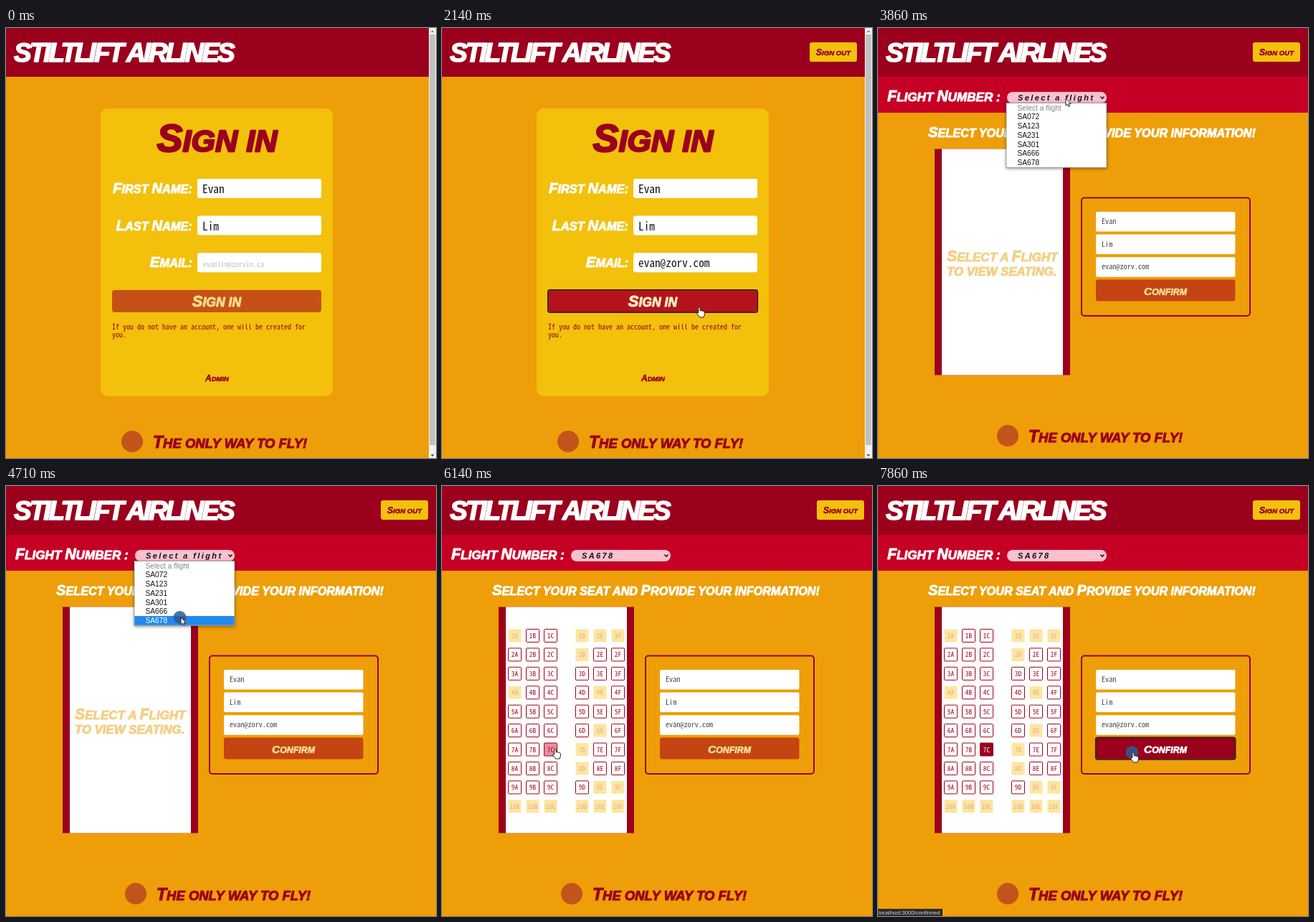
These frames come from a looping animation (600x599 px, 8000 ms). An HTML page:

```html
<!DOCTYPE html>
<html lang="en">
<head>
<meta charset="utf-8">
<title>Flight booking</title>
<style>
  html, body { margin: 0; width: 100%; height: 100%; overflow: hidden; background: #ee9e08; }
  svg { display: block; width: 100vw; height: 100vh; }
  text { white-space: pre; }
  .marker { font-family: "Liberation Sans", Arial, sans-serif; font-weight: 700; font-style: italic;
            stroke-width: .045em; stroke-linejoin: round; }
  .mono { font-family: "Noto Sans Mono CJK JP", "Noto Sans CJK JP", monospace; }
  .ui { font-family: "Open Sans", sans-serif; }
  .arial { font-family: "Liberation Sans", Arial, sans-serif; }
  .pick { font-weight: 700; font-style: italic; letter-spacing: 2.4px; }
  .pop { filter: drop-shadow(0 1px 2px rgba(0, 0, 0, .45)); }
</style>
</head>
<body>
<svg id="stage" viewBox="0 0 600 599" preserveAspectRatio="none"></svg>
<script>
const LOOP = 8000, TICK = 1000 / 7;
const RED = '#9b001c', GOLD = '#f3c00c', WHITE = '#fff', CREAM = '#f7dc8f';
const FIRST = 'Evan', LAST = 'Lim', EMAIL = 'evan@zorv.com';
const FLIGHTS = ['Select a flight', 'SA072', 'SA123', 'SA231', 'SA301', 'SA666', 'SA678'];
const COLS = { A: 92, B: 117, C: 142, D: 186, E: 211, F: 236 };
const TAKEN = '1A 1D 1E 1F 2D 4A 4E 6E 7D 8D 9E 9F 10A 10B 10C 10D 10E 10F'.split(' ');
const stage = document.getElementById('stage');

// Pointer stops: tick, x, y
const PATH = [
  [1, 330, 278], [5, 375, 326], [11, 375, 326], [13, 368, 372], [14, 359, 389],
  [19, 359, 389], [21, 359, 389], [26, 268, 98], [27, 262, 98], [33, 244, 183],
  [36, 244, 183], [42, 160, 362], [43, 158, 366], [45, 158, 366], [52, 352, 368], [54, 356, 371]
];

function pointer(n) {
  let i = PATH.findIndex(k => k[0] > n);
  if (i < 0) return PATH[PATH.length - 1].slice(1);
  if (i === 0) return PATH[0].slice(1);
  const [a, x0, y0] = PATH[i - 1], [b, x1, y1] = PATH[i];
  let u = (n - a) / (b - a);
  u = u * u * (3 - 2 * u);
  return [x0 + (x1 - x0) * u, y0 + (y1 - y0) * u];
}

const inside = ([px, py], x, y, w, h) => px >= x && px <= x + w && py >= y && py <= y + h;

const box = (x, y, w, h, fill, r = 0, extra = '') =>
  `<rect x="${x}" y="${y}" width="${w}" height="${h}" rx="${r}" fill="${fill}" ${extra}/>`;

const text = (cls, str, x, y, size, fill, extra = '') =>
  `<text class="${cls}" x="${x}" y="${y}" font-size="${size}" fill="${fill}" ${extra}>${str}</text>`;

// Capitals at full size, lower case as smaller capitals
function marker(str, x, y, size, fill, anchor = 'middle') {
  const body = str.replace(/[^A-Z]+/g, s =>
    `<tspan font-size="${size * .8}">${s.toUpperCase()}</tspan>`);
  return text('marker', body, x, y, size, fill, `text-anchor="${anchor}" stroke="${fill}"`);
}

function header(signOutX) {
  let s = box(0, 0, 600, 68, RED) +
    text('marker', 'STILTLIFT AIRLINES', 11, 47, 37, WHITE, 'letter-spacing="-3" stroke="#fff"');
  if (signOutX) s += box(signOutX, 20, 66, 27, GOLD, 3) + marker('Sign out', signOutX + 33, 38, 12, RED);
  return s;
}

const footer = (x, y) =>
  `<circle cx="${x}" cy="${y}" r="15" fill="#c2541c"/>` +
  marker('The only way to fly!', x + 29, y + 9, 23.1, RED, 'start');

function scrollbar() {
  return box(590, 0, 10, 599, '#f1f1f1') + box(591, 9, 8, 572, '#c1c1c1') +
    '<path d="M592.5 6L595 3L597.5 6Z" fill="#8a8a8a"/><path d="M592.5 594L595 597L597.5 594Z" fill="#505050"/>';
}

function status(str, w) {
  return box(0, 589, w, 10, '#2b2b2b') + text('arial', str, 1, 597, 7.7, '#d8d8d8');
}

function autofill() {
  const entry = (name, y) =>
    text('ui', 'haldenvp@zorvy.com', 274, y, 8, '#222', 'font-weight="600"') +
    text('ui', name, 274, y + 13.5, 7.4, '#333');
  return box(267, 341, 173, 108, WHITE, 1, 'class="pop"') +
    entry('Vincent Halden', 360) + entry('Vincent Morales', 396.5) +
    box(267, 423, 173, 1, '#d3e3e6') + text('ui', 'Manage...', 274, 440, 7.6, '#333');
}

function signIn(n, p) {
  const hover = n >= 13 && inside(p, 148, 365, 292, 31);
  const typed = EMAIL.slice(0, Math.max(0, Math.ceil(EMAIL.length * (n - 8) / 3)));
  let s = header(n >= 15 ? 513 : 0) + scrollbar() +
    box(132, 112, 324, 401, GOLD, 10) + marker('Sign in', 294.5, 172, 54, RED);
  [['First Name:', FIRST], ['Last Name:', LAST], ['Email:', typed]].forEach(([label, value], i) => {
    const y = 210 + 51.6 * i;
    s += marker(label, 260, y + 20, 20.5, WHITE, 'end') + box(267, y, 173, 27, WHITE, 3) +
      text('mono', value, 274, y + 20, 15.3, '#111');
  });
  if (!typed) s += text('mono', 'evanlim@zorvin.ca', 275, 332.5, 10, '#bcbcbc');
  if (n >= 5 && n < 15) s += box(267, 313.2, 173, 27, 'none', 2, 'stroke="#111" stroke-width="2"');
  s += box(148, 365, 292, 31, hover ? '#b5131b' : '#c65116', 4) +
    marker('Sign in', 294, 388, 22, hover ? '#fbefc0' : CREAM);
  if (n >= 15) s += box(147.7, 364.7, 292.8, 31.6, 'none', 3, 'stroke="#222" stroke-width="1.4"');
  s += text('mono', 'If you do not have an account, one will be created for', 148, 420, 10, RED) +
    text('mono', 'you.', 148, 430.5, 10, RED) +
    marker('Admin', 294.5, 492, 11.9, RED) + footer(176, 576);
  if (n === 7 || n === 8) s += autofill();
  return s;
}

function seats(n, p) {
  let s = '';
  for (let row = 1; row <= 10; row++) {
    for (const col in COLS) {
      const id = row + col, x = COLS[col], y = 199 + 26.42 * (row - 1);
      const taken = TAKEN.includes(id), chosen = id === '7C' && n >= 44;
      const hover = !taken && inside(p, x, y, 19, 19);
      const fill = taken ? '#fce6a0' : chosen ? RED : hover ? '#e98fa2' : WHITE;
      const ink = taken ? '#eaa79a' : chosen ? WHITE : RED;
      s += box(x + .5, y + .5, 18, 18, fill, 1, taken ? '' : `stroke="${RED}"`) +
        text('mono', id, x + 9.5, y + 13, 9.3, ink, 'text-anchor="middle"');
    }
  }
  return s;
}

function flightList(p) {
  const step = 12.75;
  let s = box(179, 104.5, 140, 90, WHITE, 0, 'class="pop" stroke="#777" stroke-width=".6"');
  FLIGHTS.forEach((name, i) => {
    const y = 104.6 + step * i, lit = i > 0 && p[1] >= y && p[1] < y + step;
    if (lit) s += box(179.3, y, 139.4, step, '#2389ec');
    s += text('arial', name, 194.5, y + 10, 10.2, lit ? WHITE : i ? '#111' : '#858585');
  });
  return s;
}

function booking(n, p) {
  const hover = n >= 45 && inside(p, 304, 350, 194, 31);
  let s = header(523) + box(0, 68, 600, 50, '#c60025') +
    marker('Flight Number :', 13, 102, 21.4, WHITE, 'start') +
    box(180, 89, 139, 16, '#fac1cf', 8) +
    text('arial pick', n < 35 ? FLIGHTS[0] : FLIGHTS[6], 195, 101, 11, '#111') +
    '<path d="M310.5 95.5L313 98.5L315.5 95.5" fill="none" stroke="#111" stroke-width="1.4"/>' +
    marker('Select your seat and Provide your information!', 298.5, 152, 20.25, WHITE) +
    box(79, 168.5, 189, 315, RED) + box(89, 168.5, 169, 315, WHITE);
  s += n >= 37 ? seats(n, p) :
    marker('Select a Flight', 96, 325, 21.3, '#f4cf84', 'start') +
    marker('to view seating.', 96, 345, 21, '#f4cf84', 'start');
  s += box(284, 236.5, 235, 164.5, 'none', 4, `stroke="${RED}" stroke-width="2"`);
  [FIRST, LAST, EMAIL].forEach((value, i) => {
    const y = 256 + 31.6 * i;
    s += box(304, y, 194.5, 27.5, WHITE, 2) + text('mono', value, 312, y + 17, 10.2, '#444');
  });
  s += box(304, 350.5, 194.5, 30, hover ? RED : '#c44414', 3) +
    marker('Confirm', 401, 372, 15.5, hover ? WHITE : CREAM);
  if (n >= 55) s += box(303.7, 350.2, 195, 30.8, 'none', 3, 'stroke="#222" stroke-width="1.5"');
  s += footer(181, 568);
  if (n >= 27 && n < 35) s += flightList(p);
  if (n < 22) s += status('Waiting for localhost...', 197);
  if (hover) s += status('localhost:3000/confirmed', 90);
  return s;
}

const SHAPES = {
  beam: '<path d="M-2 -5H-.5L0 -4.4L.5 -5H2M0 -4.4V4.4M-2 5H-.5L0 4.4L.5 5H2" fill="none" stroke="#333"/>',
  arrow: '<path d="M0 0V10.2L2.4 8L4 11.6L5.7 10.8L4.1 7.4H7.2Z" fill="#fff" stroke="#111" stroke-width=".9"/>',
  hand: '<path d="M-1.2 .8Q0 -.8 1.2 .8V5L2.8 4.6L4.4 5.2L6 5.4L7.4 6.6V10L6.2 14H.6L-3.6 8.4Q-3.6 6.8 -1.2 8Z" ' +
    'fill="#fff" stroke="#111" stroke-width=".9" stroke-linejoin="round"/>'
};

function cursor(n, p) {
  if (n < 1 || (n >= 9 && n < 12)) return '';
  let kind = 'arrow';
  if (n < 19) kind = n < 13 ? 'beam' : 'hand';
  else if (n >= 37 && n < 45) kind = p[0] < 163 && p[1] > 199 ? 'hand' : 'arrow';
  else if (n >= 45) kind = n < 46 || inside(p, 304, 350, 194, 31) ? 'hand' : 'arrow';
  const click = [33, 44, 55].includes(n)
    ? `<circle cx="${p[0] - 1.5}" cy="${p[1]}" r="9" fill="#2a5d92" fill-opacity=".85"/>` : '';
  return click + `<g transform="translate(${p[0]} ${p[1]})">${SHAPES[kind]}</g>`;
}

let shown = -1;
function draw(ms) {
  const n = Math.min(55, Math.floor((ms % LOOP + 5) / TICK));
  if (n !== shown) {
    shown = n;
    const p = pointer(n);
    stage.innerHTML = box(0, 0, 600, 599, '#ee9e08') +
      (n < 19 ? signIn(n, p) : booking(n, p)) + cursor(n, p);
  }
}

const start = performance.now();
function loop() {
  draw(performance.now() - start);
  requestAnimationFrame(loop);
}
loop();
</script>
</body>
</html>
```
